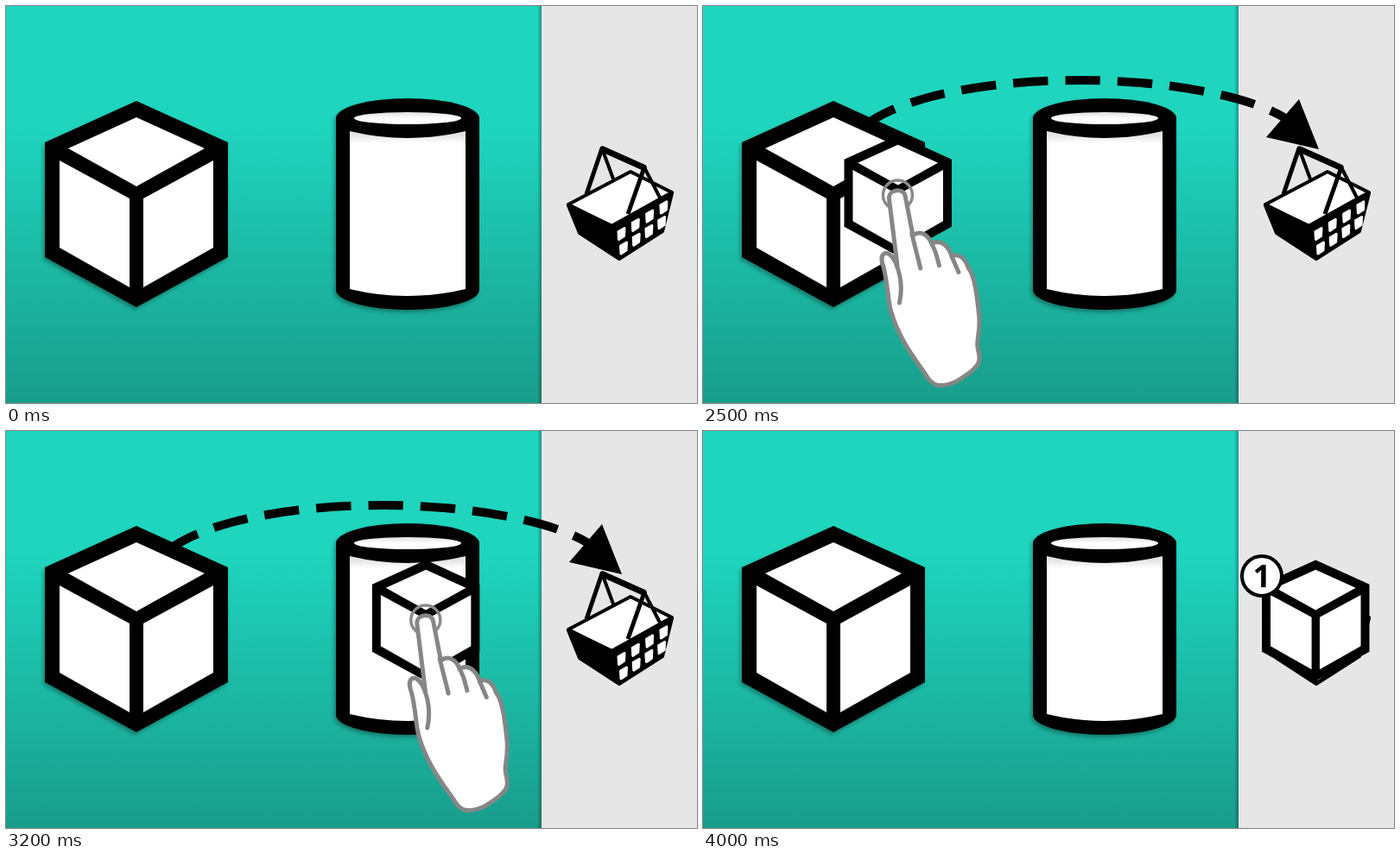
Recreate the animation shown at these times as an HTML page. Size 800x460 px, loop 6 s.

```html
<!DOCTYPE html>
<html lang="en">
<head>
<meta charset="utf-8">
<title>Drag to basket</title>
<style>
  html, body { margin: 0; width: 100%; height: 100%; overflow: hidden; }
  svg { display: block; width: 800px; height: 460px; }
  .shadow { filter: drop-shadow(-2px 3px 2px rgba(0, 0, 0, .3)); }
  .line { fill: none; stroke: #000; }
  .skin { fill: #fff; stroke: #868686; stroke-width: 5; stroke-linejoin: round; }
  .crease { fill: none; stroke: #868686; stroke-width: 5; stroke-linecap: round; }
  text { font: bold 36px "Noto Sans", "Open Sans", sans-serif; text-anchor: middle; }
</style>
</head>
<body>
<svg viewBox="0 0 800 460">
  <defs>
    <linearGradient id="teal" gradientUnits="userSpaceOnUse" x1="0" y1="140" x2="0" y2="460">
      <stop stop-color="#1fd5be"/><stop offset="1" stop-color="#199d8b"/>
    </linearGradient>
    <linearGradient id="edge">
      <stop stop-opacity="0"/><stop offset="1" stop-opacity=".3"/>
    </linearGradient>
    <linearGradient id="lid" x2="0" y2="1">
      <stop stop-color="#ddd"/><stop offset=".5" stop-color="#fff"/>
    </linearGradient>
    <linearGradient id="body" gradientUnits="userSpaceOnUse" x1="0" y1="150" x2="0" y2="159">
      <stop stop-color="#e4e4e4"/><stop offset="1" stop-color="#fff"/>
    </linearGradient>
    <!-- Cube centred on x = 0, top corner at y = 0 -->
    <g id="cube">
      <path d="M0 0L106 48V181L0 239L-106 181V48Z"/>
      <path fill="#fff" d="M0 19L79 55L0 99L-79 55ZM-89 69L-8 113V216L-89 170ZM89 69L8 113V216L89 170Z"/>
    </g>
  </defs>

  <rect width="800" height="460" fill="url(#teal)"/>
  <rect x="615" width="5" height="460" fill="url(#edge)"/>
  <rect x="620" width="180" height="460" fill="#e6e6e6"/>

  <use href="#cube" x="151" y="110" class="shadow"/>

  <g class="shadow">
    <path d="M382 130A83 23 0 0 1 548 130V329A83 23 0 0 1 382 329Z"/>
    <ellipse cx="465" cy="130" rx="62" ry="7" fill="url(#lid)"/>
    <path fill="url(#body)" d="M398 145Q465 161 532 145V328Q465 344 398 328Z"/>
  </g>

  <g id="basket" stroke-linejoin="round">
    <path d="M651 230L723 192L771 216L701 255Z" fill="#fff" stroke="#000" stroke-width="4"/>
    <path d="M651 231L702 255L771 217L760 261L710 293L664 263Z" stroke="#000" stroke-width="4"/>
    <path class="line" stroke-width="4" d="M690 165L704 203M739 187L757 222"/>
    <path class="line" stroke-width="5" d="M672 218L690 165L739 187L720 241"/>
    <path class="line" stroke-width="7" stroke-linecap="round" d="M691 166L738 187"/>
    <g id="cells" fill="#fff" stroke="#fff" stroke-width="3"></g>
  </g>

  <g id="arrow">
    <path class="line" stroke-width="10" stroke-dasharray="40.4 20" stroke-dashoffset="10"
      d="M195 133C248 99 350 86 437 86S628 101 676 131"/>
    <path d="M690 108L713 166L652 152Z"/>
  </g>

  <use id="parcel" href="#cube"/>

  <g id="badge">
    <circle cx="647" cy="168" r="23" fill="#fff" stroke="#000" stroke-width="4"/>
    <text x="647" y="181">1</text>
  </g>

  <g id="pointer">
    <circle id="ring" r="17" fill="none" stroke="#8a8a8a" stroke-width="3.5"/>
    <!-- Hand drawn at its first resting place, then moved to the fingertip -->
    <g id="hand">
      <g transform="translate(-151 -219)">
        <path class="skin" d="M139 300L141 222C141 211 160 211 160 222L162 268
          C172 263 180 270 182 281C192 276 201 285 203 299C212 295 218 304 220 315
          C226 325 225 350 224 372C222 395 216 398 217 410C219 425 214 428 205 434
          C190 442 180 447 165 444C155 440 155 432 148 420C138 400 128 380 124 352
          C122 340 125 320 123 300C119 282 130 278 136 292Z"/>
        <path class="crease" d="M138 298C142 315 140 330 135 343M161 266L165 307
          M182 281C186 290 186 300 187 307M203 299L208 318"/>
      </g>
    </g>
  </g>
</svg>

<script>
  const LOOP = 6000, STEP = 100;
  const $ = id => document.getElementById(id);
  const show = (id, on) => $(id).setAttribute('visibility', on ? 'visible' : 'hidden');
  const place = (id, transform) => $(id).setAttribute('transform', transform);

  // Basket mesh: two rows of four slanted cells
  const cell = (x, y) => `<path d="M${x - 3.5} ${y - 2.5}l7 -4l-.5 9l-6 4z"/>`;
  for (let i = 0; i < 4; i++) {
    $('cells').innerHTML += cell(712.5 + 16.3 * i, 264 - 10.2 * i) + cell(715 + 14.7 * i, 280.5 - 9.8 * i);
  }

  function draw(time) {
    const tick = Math.floor(time % LOOP / STEP);
    const x = 151 + 37.2 * Math.min(15, Math.max(0, tick - 23));
    const pressed = tick >= 21;

    show('arrow', tick >= 10 && tick < 40);
    show('pointer', tick >= 20 && tick < 40);
    show('ring', pressed && tick < 39);
    show('parcel', tick >= 22);
    show('badge', tick >= 39);

    place('pointer', `translate(${x} 219)`);
    place('hand', pressed ? 'translate(-.5 0) rotate(-8.5)' : '');
    place('parcel', `translate(${x + .3} 149.5) scale(.587)`);
  }

  const start = performance.now();
  function frame() {
    draw(performance.now() - start);
    requestAnimationFrame(frame);
  }
  draw(0);
  requestAnimationFrame(frame);
</script>
</body>
</html>
```
